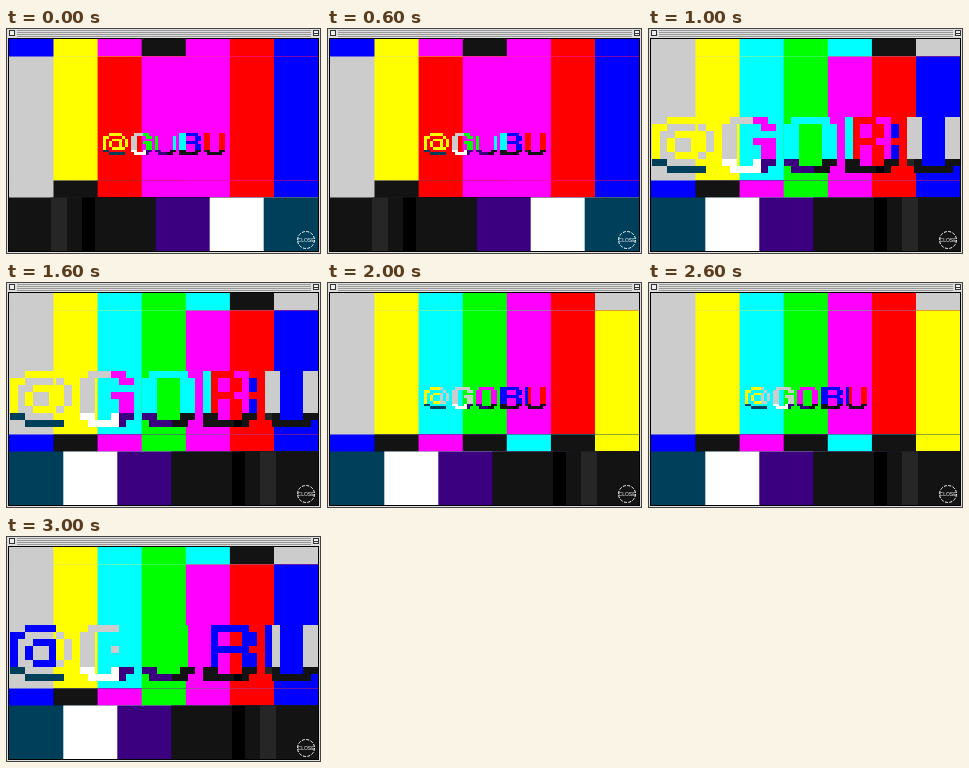
An HTML page that plays this animation: 315x226 px, repeating every 4000 ms.

```html
<!DOCTYPE html>
<html lang="en">
<head>
<meta charset="utf-8">
<title>Test card</title>
<style>
html, body { margin: 0; width: 100%; height: 100%; overflow: hidden; background: #fff; }
svg { display: block; width: 315px; height: 226px; }
text { font: 5px "Liberation Sans", Arial, sans-serif; }
</style>
</head>
<body>
<svg viewBox="0 0 315 226">
  <rect width="315" height="226" fill="#444"/>
  <rect x="1" y="1" width="313" height="224" fill="#ddd"/>
  <rect x="2" y="10" width="311" height="214" fill="#000"/>
  <path d="M11 2.5H305M11 4.5H305M11 6.5H305M11 8.5H305" stroke="#999"/>
  <g fill="#eee" stroke="#333">
    <rect x="3.5" y="2.5" width="5" height="5"/>
    <rect x="307.5" y="2.5" width="5" height="5"/>
    <path d="M307 5.5h6"/>
  </g>
  <g id="card"></g>
  <circle cx="300" cy="212" r="8.5" fill="none" stroke="#fff" stroke-dasharray="3 1.45"/>
  <text x="300" y="214" fill="#fff" text-anchor="middle">CLOSE</text>
</svg>
<script>
const card = document.getElementById('card');
const colors = {
  g: '#ccc', y: '#ff0', c: '#0ff', e: '#0f0', m: '#f0f', r: '#f00', b: '#00f',
  k: '#131313', d: '#000', l: '#262626', w: '#fff', p: '#3a007f', n: '#003f5a'
};
const left = 3, right = 312;
const levels = [11, 28.5, 152.5, 169.5, 223];
const base = [[57.3, 'n'], [111.3, 'w'], [165.3, 'p'], [226, 'k'], [239, 'd'], [254, 'k'], [270, 'l'], [right, 'k']];

// Bars from top to bottom, then the colours seen through the letters.
const scenes = [
  { bars: ['bymkmrb', 'gyrmmrb', 'gkrmmrb'], flip: true, small: true,
    ink: [[66, 'y'], [106, 'g'], [140, 'e'], [185, 'm'], [209, 'c'], [250, 'b'], [315, 'r']] },
  { bars: ['gyceckg', 'gycemrb', 'bkmemrb'],
    ink: [[48, 'y'], [106, 'g'], [130, 'm'], [205, 'c'], [224, 'r'], [245, 'm'], [258, 'b'], [315, 'g']] },
  { bars: ['gycemrg', 'gycemry', 'bkmkcky'], small: true,
    ink: [[42, 'y'], [127, 'g'], [200, 'm'], [270, 'b'], [315, 'r']] },
  { bars: ['gyceckg', 'gycemrb', 'bkmemrb'],
    ink: [[48, 'b'], [113, 'g'], [130, 'c'], [185, 'e'], [205, 'm'], [268, 'b'], [315, 'g']] }
];

// The word "@GOBU" on a pixel grid.
const glyphs = [
  '..####.. ##....#. #..###.# #.#..#.# #.#..#.# #..####. ##...... ..#####.',
  '.#####. ##...## ##..... ##..### ##...## ##...## ##..### .#####.',
  '.#####. ##...## ##...## ##...## ##...## ##...## ##...## .#####.',
  '######. ##...## ##...## ######. ##...## ##...## ##...## ######.',
  '##...## ##...## ##...## ##...## ##...## ##...## ##...## .#####.'
].map(rows => rows.split(' '));

const pick = (bands, x) => (bands.find(b => x < b[0]) || bands[bands.length - 1])[1];

function rect(x0, y0, x1, y1, key) {
  return `<rect x="${x0}" y="${y0}" width="${x1 - x0}" height="${y1 - y0}" fill="${colors[key]}"/>`;
}

// Each bar runs on beneath its neighbours, so soft edges leave no gaps.
function drawBars({ bars, flip }) {
  const edge = i => i ? 47.5 + (i - 1) * 44.1 : left;
  let out = '';
  bars.forEach((row, r) => [...row].forEach((key, i) => {
    out += rect(edge(i), levels[r], right, levels[r + 1] + 1, key);
  }));
  const bands = flip
    ? base.map(([end, key], i) => [315 - end, key]).reverse()
    : base.map(([, key], i) => [i ? base[i - 1][0] : left, key]);
  for (const [x, key] of bands) out += rect(x, levels[3], right, levels[4], key);
  return out;
}

function drawWord({ small, ink }) {
  const scale = small ? 0.394 : 1;
  const px = x => Math.round(small ? 97 + (x - 3) * scale : x);
  const py = y => Math.round((small ? 105 : 89) + y * scale);
  let out = '';
  glyphs.forEach((rows, n) => {
    const start = n ? 12.5 + n * 61.5 : 4;
    rows.forEach((line, r) => [...line].forEach((cell, c) => {
      if (cell !== '#') return;
      const x = start + c * 7.7;
      const key = pick(r > 5 ? base : ink, x + 3.8);
      out += rect(px(x), py(r * 7), Math.min(px(x + 7.7), right), py(r * 7 + 7), key);
    }));
  });
  return out;
}

let shown = -1;
function frame(now) {
  const i = Math.floor(now % 4000 / 1000);
  if (i !== shown) {
    shown = i;
    card.innerHTML = drawBars(scenes[i]) + drawWord(scenes[i]);
  }
  requestAnimationFrame(frame);
}
frame(performance.now());
</script>
</body>
</html>
```
